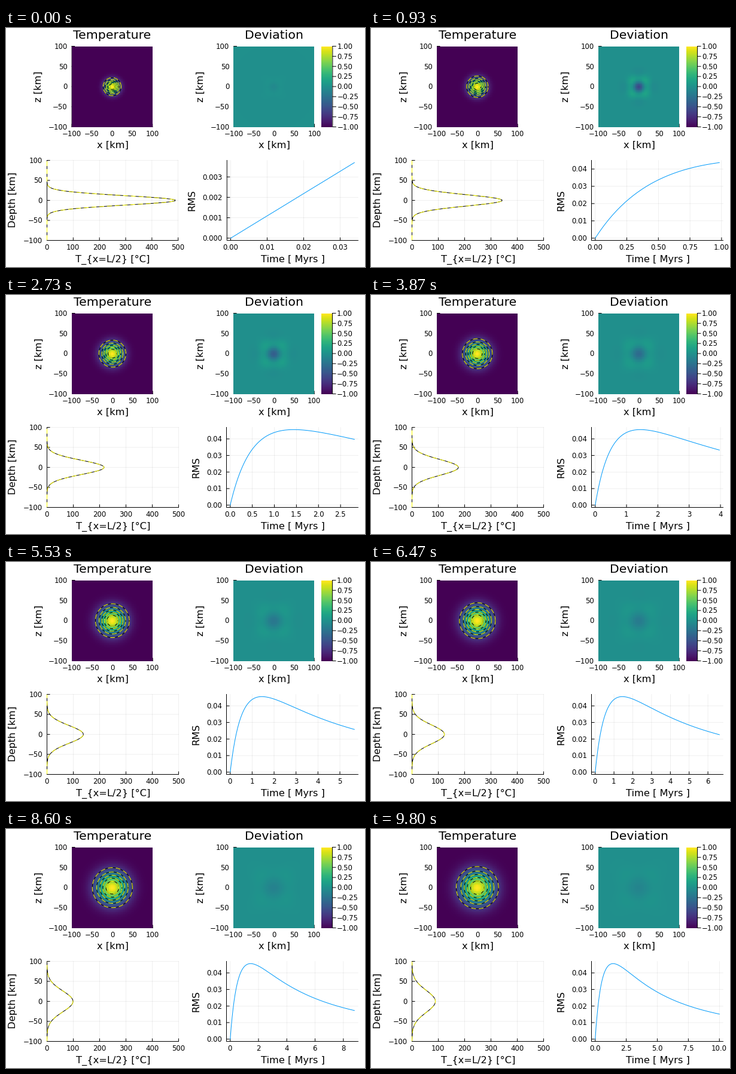
Recreate the animation shown at these times as a matplotlib script. Size 600 by 400 pixels, loop 9.87 s.

```python
import math

import matplotlib
import matplotlib.pyplot as plt
import numpy as np
from matplotlib.animation import FuncAnimation
from matplotlib.transforms import Affine2D

matplotlib.rcParams["font.family"] = "DejaVu Sans"
matplotlib.rcParams["path.snap"] = False

W, H = 600, 400
TICKS, INTERVAL = 210, 47   # timer ticks, 9870 ms per loop
FPS, STATES = 15, 148       # rate and number of simulation states
PT = 0.72                   # points per pixel at 100 dpi
SMALL, GUIDE, TITLE = 11.7, 16.2, 20.5

# Diffusing Gaussian: lengths in km, times in Myrs
STEP = 10 / 295
PEAK, WIDTH2, RATE = 500, 273, 0.4625
RMS_SCALE, DEV_SCALE = 0.1135, 1.743
CELLS = np.arange(-99, 100, 2)
X, Z = np.meshgrid(CELLS, CELLS)

BLUE, YELLOW = "#009afa", "#ffff00"
DASH = (0, (8, 5))
NICE = ((1, 1), (5, 0.9), (2, 0.7), (2.5, 0.5), (3, 0.2))

TOP, BOTTOM = 30.5, 165.5           # upper row
LOW_TOP, LOW_BOTTOM = 221.5, 355.5  # lower row
SIDE = 134.7                        # heat map edge

fig = plt.figure(figsize=(W / 100, H / 100), dpi=100, facecolor="white")
stage = fig.add_axes([0, 0, 1, 1])
stage.set_axis_off()

temp_shift, dev_shift = Affine2D(), Affine2D()
temp_tr = temp_shift + stage.transData
dev_tr = dev_shift + stage.transData


def line(xs, ys, color="black", width=1.0, tr=None, **kw):
    return stage.plot(xs, ys, color=color, lw=width * PT,
                      transform=tr or stage.transData, **kw)[0]


def text(x, y, s, size, tr=None, ha="center", rotation=0):
    return stage.text(x, y, s, fontsize=size * PT, ha=ha, va="baseline",
                      rotation=rotation, rotation_mode="anchor",
                      transform=tr or stage.transData)


def number(v, digits=0):
    return f"{v:.{digits}f}".replace("-", "\u2212")


def axes_box(x0, x1, y0, y1, xticks, yticks, tr=None, grid=True):
    """Left and bottom axis; ticks are (position, label) pairs."""
    made = []
    if grid:
        for x, _ in xticks:
            made.append(line([x, x], [y0, y1], width=0.6, tr=tr, alpha=0.1, zorder=1))
        for y, _ in yticks:
            made.append(line([x0, x1], [y, y], width=0.6, tr=tr, alpha=0.1, zorder=1))
    order = 5 if grid else 1
    made.append(line([x0, x0, x1], [y0, y1, y1], tr=tr, zorder=order))
    for x, label in xticks:
        made.append(line([x, x], [y1, y1 - 4.5], tr=tr, zorder=order))
        made.append(text(x - 0.3, y1 + 15.5, label, SMALL, tr))
    for y, label in yticks:
        made.append(line([x0, x0 + 4.5], [y, y], tr=tr, zorder=order))
        made.append(text(x0 - 7.5, y + 4.3, label, SMALL, tr, ha="right"))
    return made


def km_ticks(start, end, step):
    return [(start + (end - start) * (v + 100) / 200, number(v))
            for v in range(-100, 101, step)]


def picture(data, x0, x1, tr, low, high):
    return stage.imshow(data, cmap="viridis", vmin=low, vmax=high,
                        extent=(x0, x1, BOTTOM + 0.5, TOP + 0.5), aspect="auto",
                        interpolation="nearest", transform=tr, zorder=2)


def heat_panel(x0, title, tr, low, high):
    x1 = x0 + SIDE
    mid = (x0 + x1) / 2
    axes_box(x0, x1, TOP, BOTTOM, km_ticks(x0, x1, 50),
             km_ticks(BOTTOM, TOP, 50), tr, grid=False)
    text(mid, 18, title, TITLE, tr)
    text(mid + 0.5, 201, "x [km]", GUIDE, tr)
    text(x0 - 51, 98, "z [km]", GUIDE, tr, rotation=90)
    return picture(np.zeros(X.shape), x0 - 0.5, x0 + 134.5, tr, low, high)


def color_bar():
    x0, x1 = 527, 545
    picture(np.linspace(1, -1, 256)[:, None], x0, x1, dev_tr, -1, 1)
    line([x1 + 0.5] * 2, [TOP, BOTTOM], tr=dev_tr, zorder=5)
    for v in np.linspace(-1, 1, 9):
        y = BOTTOM + (TOP - BOTTOM) * (v + 1) / 2
        line([x1 + 0.5, x1 + 6], [y, y], tr=dev_tr, zorder=5)
        text(x1 + 8, y + 4.3, number(v, 2), SMALL, dev_tr, ha="left")


def auto_ticks(top):
    """Round step with the best mix of tick count, niceness and coverage."""
    span, high = 1.06 * top, 1.03 * top
    power = math.floor(math.log10(span))
    options = []
    for z in (power - 1, power):
        for q, nice in NICE:
            step = q * 10.0 ** z
            n = math.floor(high / step + 1e-9) + 1
            if 4 <= n <= 8:
                score = ((1 - abs(n - 5) / 5) / 4 + nice / 4
                         + 0.5 * span / ((n - 1) * step))
                options.append((round(score, 9), -n, step))
    _, n, step = max(options)
    digits = 0
    while abs(round(step, digits) - step) > 1e-9:
        digits += 1
    return [i * step for i in range(-n)], digits


temp_image = heat_panel(110.5, "Temperature", temp_tr, 0, 1)
dev_image = heat_panel(380.5, "Deviation", dev_tr, -1, 1)
color_bar()

rings = [(level, line([], [], color, 1, temp_tr, linestyle=style, zorder=z))
         for level in range(1, 6)
         for color, style, z in (("black", "-", 3), (YELLOW, DASH, 4))]
profiles = [line([], [], "black", zorder=6),
            line([], [], YELLOW, linestyle=DASH, zorder=7)]
rms_line = line([], [], BLUE, zorder=6)
text(16, 288, "Depth [km]", GUIDE, rotation=90)

stage.set_xlim(0, W)
stage.set_ylim(H, 0)

angle = np.linspace(0, 2 * np.pi, 121)
scratch = []


def draw_heat(t):
    s = 1 + RATE * t
    w2 = WIDTH2 * s
    gauss = np.exp(-(X**2 + Z**2) / w2)
    temp_image.set_data(gauss / gauss.max())

    def hermite(v):
        return 16 * v**4 / w2**2 - 48 * v**2 / w2 + 12

    dev_image.set_data(-DEV_SCALE * t / s**3 * (hermite(X) + hermite(Z)) / 24 * gauss)
    for level, ring in rings:
        r = math.sqrt(w2 * math.log(6 / level) + 2) * SIDE / 200
        ring.set_data(177.8 + r * np.cos(angle), 98.2 - r * np.sin(angle))


def draw_profile(t, shift):
    s = 1 + RATE * t
    x0, x1 = 68.5, 288.5 - shift
    temps = PEAK / s * np.exp(-(CELLS**2 + 1) / (WIDTH2 * s))
    ys = LOW_BOTTOM + (LOW_TOP - LOW_BOTTOM) * (CELLS + 100) / 200
    for p in profiles:
        p.set_data(x0 + (x1 - x0) * temps / 500, ys)
    xticks = [(x0 + (x1 - x0) * v / 500, number(v)) for v in range(0, 501, 100)]
    scratch.extend(axes_box(x0, x1, LOW_TOP, LOW_BOTTOM, xticks,
                            km_ticks(LOW_BOTTOM, LOW_TOP, 50)))
    scratch.append(text((x0 + x1) / 2 + 0.5, 392, "T_{x=L/2} [°C]", GUIDE))


def draw_rms(times, rms, yvals, ydigits, shift):
    x0, x1 = 368.5 + shift, 588.5

    def px(v):
        return x0 + (x1 - x0) * (v / times[-1] + 0.03) / 1.06

    def py(v):
        return LOW_BOTTOM + (LOW_TOP - LOW_BOTTOM) * (v / rms.max() + 0.03) / 1.06

    rms_line.set_data(px(times), py(rms))
    xvals, xdigits = auto_ticks(times[-1])
    scratch.extend(axes_box(x0, x1, LOW_TOP, LOW_BOTTOM,
                            [(px(v), number(v, xdigits)) for v in xvals],
                            [(py(v), number(v, ydigits)) for v in yvals]))
    scratch.append(text((x0 + x1) / 2 + 0.5, 392, "Time [ Myrs ]", GUIDE))
    scratch.append(text(322.5 - 7.45 * (ydigits - 2) + shift, 288.5, "RMS", GUIDE,
                        rotation=90))


def update(tick):
    # State reached by the end of this tick
    k = min(int(((tick + 1) * INTERVAL + 4) * FPS / 1000), STATES - 1)
    for artist in scratch:
        artist.remove()
    scratch.clear()
    times = STEP * np.arange(2 * k + 2)
    rms = RMS_SCALE * times / (1 + RATE * times) ** 2.5
    yvals, ydigits = auto_ticks(rms.max())
    # Longer tick labels squeeze the columns apart
    shift = {3: 0.8, 4: 4.5}.get(ydigits, 0)
    temp_shift.clear().translate(-shift / 2, 0)
    dev_shift.clear().translate(shift / 2, 0)
    draw_heat(times[-1])
    draw_profile(times[-1], shift)
    draw_rms(times, rms, yvals, ydigits, shift)
    return []


anim = FuncAnimation(fig, update, frames=TICKS, init_func=lambda: [],
                     interval=INTERVAL, repeat=True, repeat_delay=0)
plt.show()
```
